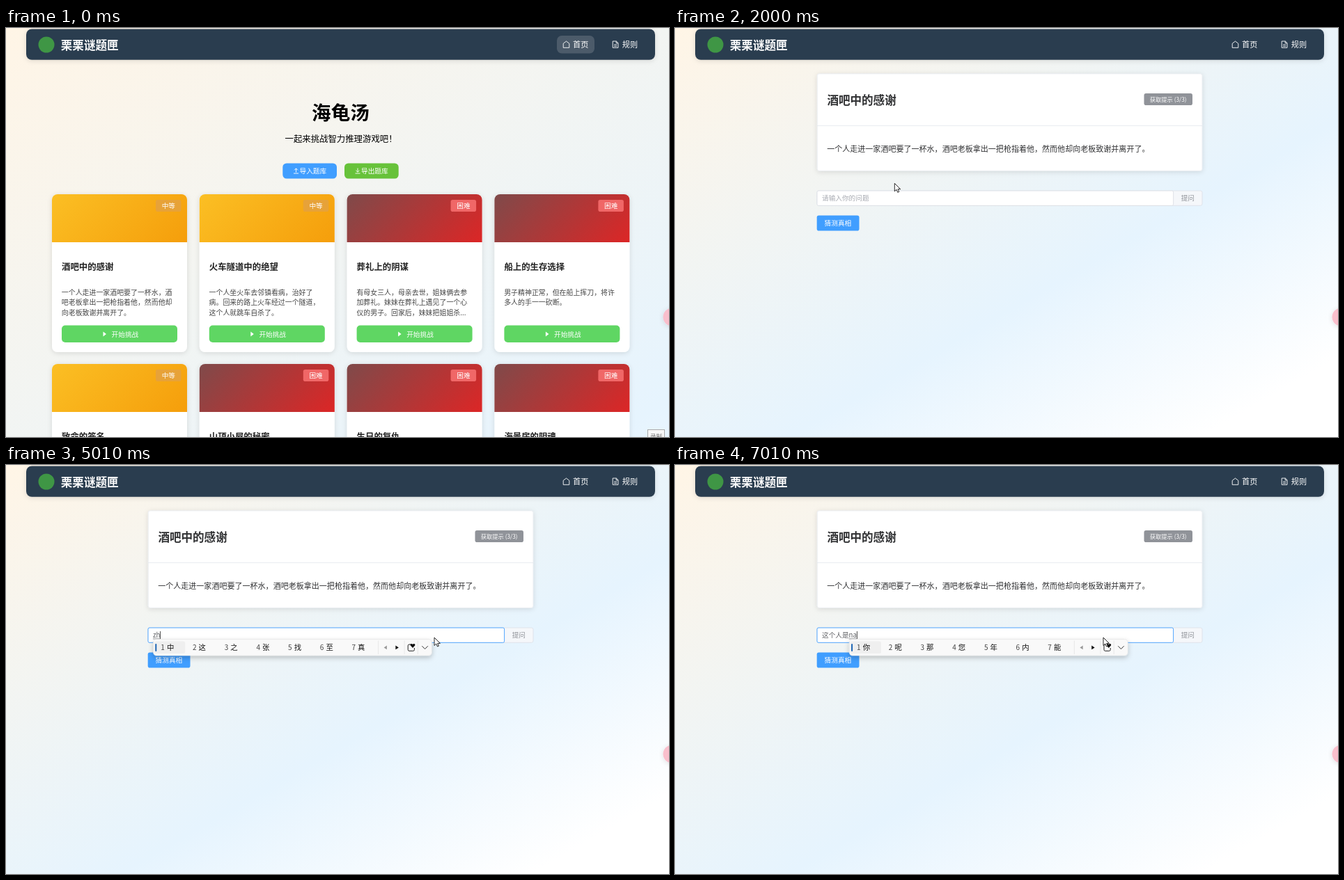
An HTML page for the animation above (8000 ms loop, 952x588 px).

```html
<!DOCTYPE html>
<html lang="zh-CN">
<head>
<meta charset="utf-8">
<title>海龟汤</title>
<style>
html, body { margin: 0; width: 100%; height: 100%; overflow: hidden; background: #fff; }
svg { display: block; width: 952px; height: 588px; font-family: "Noto Sans CJK SC", "Noto Sans CJK", sans-serif; }
text { white-space: pre; }
</style>
</head>
<body>
<svg id="stage" viewBox="0 0 952 588">
  <defs>
    <linearGradient id="sky"><stop stop-color="#fff5e6"/><stop offset=".6" stop-color="#e6f4fe"/><stop offset=".9" stop-color="#fff"/></linearGradient>
    <linearGradient id="skyHome" href="#sky" gradientUnits="userSpaceOnUse" x1="0" y1="0" x2="784" y2="1358"/>
    <linearGradient id="skyPlay" href="#sky" gradientUnits="userSpaceOnUse" x1="0" y1="0" x2="492" y2="853"/>
    <linearGradient id="medium" gradientUnits="userSpaceOnUse" x1="31" y1="-31" x2="163" y2="100"><stop stop-color="#fbbf24"/><stop offset="1" stop-color="#f59e0b"/></linearGradient>
    <linearGradient id="hard" gradientUnits="userSpaceOnUse" x1="31" y1="-31" x2="163" y2="100"><stop stop-color="#7f4a4a"/><stop offset="1" stop-color="#dc2626"/></linearGradient>
    <filter id="soft" x="-20%" y="-20%" width="140%" height="140%"><feDropShadow dx="0" dy="1.4" stdDeviation="3.5" flood-opacity=".12"/></filter>
    <filter id="lift" x="-20%" y="-60%" width="140%" height="280%"><feDropShadow dx="0" dy="3" stdDeviation="3.5" flood-opacity=".22"/></filter>
  </defs>
</svg>
<script>
const stage = document.getElementById('stage');

const rect = (x, y, w, h, fill, r = 0, more = '') =>
  `<rect x="${x}" y="${y}" width="${w}" height="${h}" rx="${r}" fill="${fill}" ${more}/>`;
const text = (x, y, size, fill, str, more = '') =>
  `<text x="${x}" y="${y}" font-size="${size}" fill="${fill}" ${more}>${str}</text>`;
const line = (d, stroke, width = 1) =>
  `<path d="${d}" fill="none" stroke="${stroke}" stroke-width="${width}"/>`;
const shape = (d, fill) => `<path d="${d}" fill="${fill}"/>`;
const at = (x, y, body) => `<g transform="translate(${x} ${y})">${body}</g>`;
const bold = 'font-weight="700"';

const levels = {
  medium: { label: '中等', tag: '#e6a23c' },
  hard: { label: '困难', tag: '#f56c6c' }
};

const cards = [
  ['medium', '酒吧中的感谢', '一个人走进一家酒吧要了一杯水，酒', '吧老板拿出一把枪指着他，然而他却', '向老板致谢并离开了。'],
  ['medium', '火车隧道中的绝望', '一个人坐火车去邻镇看病，治好了', '病。回来的路上火车经过一个隧道，', '这个人就跳车自杀了。'],
  ['hard', '葬礼上的阴谋', '有母女三人，母亲去世，姐妹俩去参', '加葬礼。妹妹在葬礼上遇见了一个心', '仪的男子。回家后，妹妹把姐姐杀...'],
  ['hard', '船上的生存选择', '男子精神正常，但在船上挥刀，将许', '多人的手一一砍断。'],
  ['medium', '致命的签名'],
  ['hard', '山顶小屋的秘密'],
  ['hard', '生日的复仇'],
  ['hard', '海景房的阴魂']
];

function card([level, title, ...lines], i, hover) {
  const { label, tag } = levels[level];
  const x = 66 + (i % 4) * 211.8;
  const y = 239 + (i >> 2) * 244 - (hover ? 2.8 : 0);
  return at(x, y,
    rect(0, 0, 194, 227, '#fff', 8, 'filter="url(#soft)"') +
    shape('M0 69V8a8 8 0 0 1 8-8H186a8 8 0 0 1 8 8V69Z', `url(#${level})`) +
    rect(149, 8, 36.5, 17, tag, 2.8, 'fill-opacity=".92"') +
    text(167.3, 19.9, 9.66, '#fff', label, 'text-anchor="middle"') +
    text(14, 108.5, 12.4, '#222', title, bold) +
    lines.map((s, n) => text(13.8, 144.6 + n * 14.8, 9.94, '#444', s)).join('') +
    rect(14, 188.5, 166, 24.5, hover ? '#5bc45f' : '#5fd663', 5) +
    shape('M73.5 197.6V204.4L78 201Z', '#fff') +
    text(85.6, 204.6, 9.66, '#fff', '开始挑战'));
}

function header(home) {
  return rect(29, 1.5, 903, 44.3, '#2c3e50', 8, 'filter="url(#soft)"') +
    '<circle cx="58" cy="24" r="11.5" fill="#3f9645"/>' +
    text(78.8, 30.8, 16.56, '#fff', '栗栗谜题匣', bold) +
    (home ? rect(791, 11, 54, 25.5, '#4c5b6a', 7) : '') +
    line('M800.2 22.3L804.5 19L808.8 22.3V28.3H800.2Z', '#fff', .9) +
    text(814, 28.3, 11.2, '#fff', '首页') +
    line('M871.2 19H876.4L879 21.6V28.3H871.2ZM876.2 19V21.8H879M873 24H877.2M873 26.2H877.2', '#fff', .9) +
    text(884.7, 28.3, 11.2, '#fff', '规则');
}

const bubble = '<circle cx="956.5" cy="415.5" r="13" fill="#f9bfcc" filter="url(#soft)"/>';

function homePage(hover) {
  return rect(0, 0, 952, 588, 'url(#skyHome)') + header(true) +
    text(480.5, 132.3, 27.6, '#000', '海龟汤', bold + ' text-anchor="middle"') +
    text(400.5, 163.7, 12.4, '#000', '一起来挑战智力推理游戏吧！') +
    rect(397.3, 194.5, 77.7, 22, '#409eff', 5.5) +
    line('M416.5 207.5V202M414 204.3L416.5 201.8L419 204.3M413 209H420', '#fff', .9) +
    text(421.5, 209.2, 9.66, '#fff', '导入题库') +
    rect(486, 194.5, 77.7, 22, '#67c23a', 5.5) +
    line('M505 201.5V207M502.5 204.7L505 207.2L507.5 204.7M501.5 209H508.5', '#fff', .9) +
    text(510, 209.2, 9.66, '#fff', '导出题库') +
    cards.map((c, i) => card(c, i, hover && i === 0)).join('') + bubble +
    (hover ? at(157, 429, hand) :
      rect(921.5, 577.5, 24, 14, '#f8f8f8', 0, 'stroke="#aaa"') + text(925, 590, 8.5, '#777', '录制'));
}

function playPage({ border, typed, ime, pointer }) {
  const story = '一个人走进一家酒吧要了一杯水，酒吧老板拿出一把枪指着他，然而他却向老板致谢并离开了。';
  return rect(0, 0, 952, 588, 'url(#skyPlay)') + header(false) +
    rect(204.2, 65.8, 552.8, 139.6, '#fff', 2.8, 'stroke="#e4e7ed" stroke-width=".7" filter="url(#soft)"') +
    line('M204 140.5H757', '#e4e7ed', .8) +
    text(218.4, 110.2, 16.56, '#303133', cards[0][1], bold) +
    rect(673.5, 94, 69.5, 17, '#909399', 2.8) +
    text(708.2, 105.5, 8.28, '#fff', '获取提示 (3/3)', 'text-anchor="middle"') +
    text(218.2, 177.9, 11.04, '#303133', story) +
    rect(204, 234, 553, 21.3, '#f5f7fa', 2.5, 'stroke="#dcdfe6" stroke-width=".8"') +
    text(726.7, 248.2, 9.66, '#909399', '提问') +
    rect(204, 234, 511.6, 21.3, '#fff', 2, `stroke="${border}" stroke-width=".9"`) +
    (typed ? typing(typed) : text(211, 248.2, 9.66, '#a8abb2', '请输入你的问题')) +
    rect(203.7, 269.4, 60.8, 22.2, '#409eff', 2.8) +
    text(214.6, 284.1, 9.66, '#fff', '猜测真相') +
    bubble + (ime ? at(211.5 + typed[0].length * 9.7, 250.5, panel(ime)) : '') + pointer;
}

function typing([done, pending]) {
  const widths = { z: .43, h: .61, e: .55, g: .56, r: .39, n: .61, a: .56 };
  const from = 211 + done.length * 9.66;
  const to = from + [...pending].reduce((sum, c) => sum + widths[c] * 9.66, 0);
  return text(211, 248.2, 9.66, '#606266', done + pending) +
    line(`M${from} 249.9H${to}`, '#606266', .7) + line(`M${to + .5} 239V250`, '#222', .8);
}

// Candidate window: each entry widens by one glyph per extra character.
function panel(words) {
  let x = 0;
  const items = words.map((word, i) => {
    const wide = 45.7 + (word.length - 1) * 10.4;
    const item = (i ? '' : rect(1.5, 3, wide - 1.5, 17.5, '#efefef', 2.5) + rect(2.8, 6.5, 2, 11, '#1f66b5', 1)) +
      text(x + 10.8, 15.6, 10, '#444', i + 1) + text(x + 19.4, 15.6, 10.4, '#111', word);
    x += wide;
    return item;
  }).join('');
  return rect(0, 0, x + 80, 23.5, '#f9f9f9', 4.5, 'stroke="#ddd" stroke-width=".5" filter="url(#lift)"') + items +
    at(x, 0,
      line('M3.2 2V21.5M40.7 2V21.5M60 2V21.5', '#e5e5e5', .8) +
      shape('M15.5 9V14.8L11.2 11.9Z', '#999') +
      shape('M28 9V14.8L32.5 11.9Z', '#111') +
      line('M50 7.5H47.5Q45.8 7.5 45.8 9.2V15Q45.8 16.8 47.5 16.8H53.3Q55 16.8 55 15V12.5', '#222', 1) +
      shape('M52.6 12.4L49.4 9Q48.7 6.4 50.8 6.4Q52 6.4 52.6 7.5Q53.2 6.4 54.4 6.4Q56.5 6.4 55.8 9Z', '#111') +
      line('M66 9.8L70.2 14L74.4 9.8', '#333', 1));
}

const arrow = '<path d="M0 0V11.5L2.7 9L4.5 13L6.4 12.2L4.7 8.4H8.4Z" fill="#fff" stroke="#111" stroke-width=".9"/>';
const beam = line('M-2.5 .5H-.8L0 1.2L.8 .5H2.5M0 1V11.5M-2.5 12H-.8L0 11.3L.8 12H2.5', '#222', 1);
const hand = '<path d="M4 9.5V1.6a1.2 1.2 0 0 1 2.4 0V6Q7.5 4.9 8.6 6.2Q9.8 5.3 10.7 6.6Q12.4 6 12.5 8V11.5Q12.5 13 11.5 14.2V16H5.5V14.5L1.5 9.8Q1 8.2 2.6 8.3Z" fill="#fff" stroke="#111" stroke-width=".9"/>';

const focus = '#409eff';
const resting = at(615, 248, arrow);
const scenes = [
  [0, () => homePage(false)],
  [1000, () => homePage(true)],
  [2000, () => playPage({ border: '#dcdfe6', pointer: at(315.3, 223.3, arrow) })],
  [3000, () => playPage({ border: '#c0c4cc', pointer: at(616, 245, beam) })],
  [4010, () => playPage({ border: focus, pointer: at(615.8, 242, beam) })],
  [5010, () => playPage({ border: focus, typed: ['', 'zh'], ime: [...'中这之张找至真'], pointer: resting })],
  [6010, () => playPage({ border: focus, typed: ['', 'zhegeren'], ime: ['这个人', '这个仁', '这个', '这', '着', '者'], pointer: resting })],
  [7010, () => playPage({ border: focus, typed: ['这个人是', 'na'], ime: [...'你呢那您年内能'], pointer: resting })]
];

const layers = scenes.map(([, draw]) => {
  const g = document.createElementNS('http://www.w3.org/2000/svg', 'g');
  g.innerHTML = draw();
  return stage.appendChild(g);
});

const start = performance.now();
function render(now) {
  const t = Math.max(0, now - start) % 8000;
  const current = scenes.findLastIndex(([from]) => t >= from);
  layers.forEach((g, i) => g.setAttribute('display', i === current ? 'inline' : 'none'));
  requestAnimationFrame(render);
}
render(start);
</script>
</body>
</html>
```
